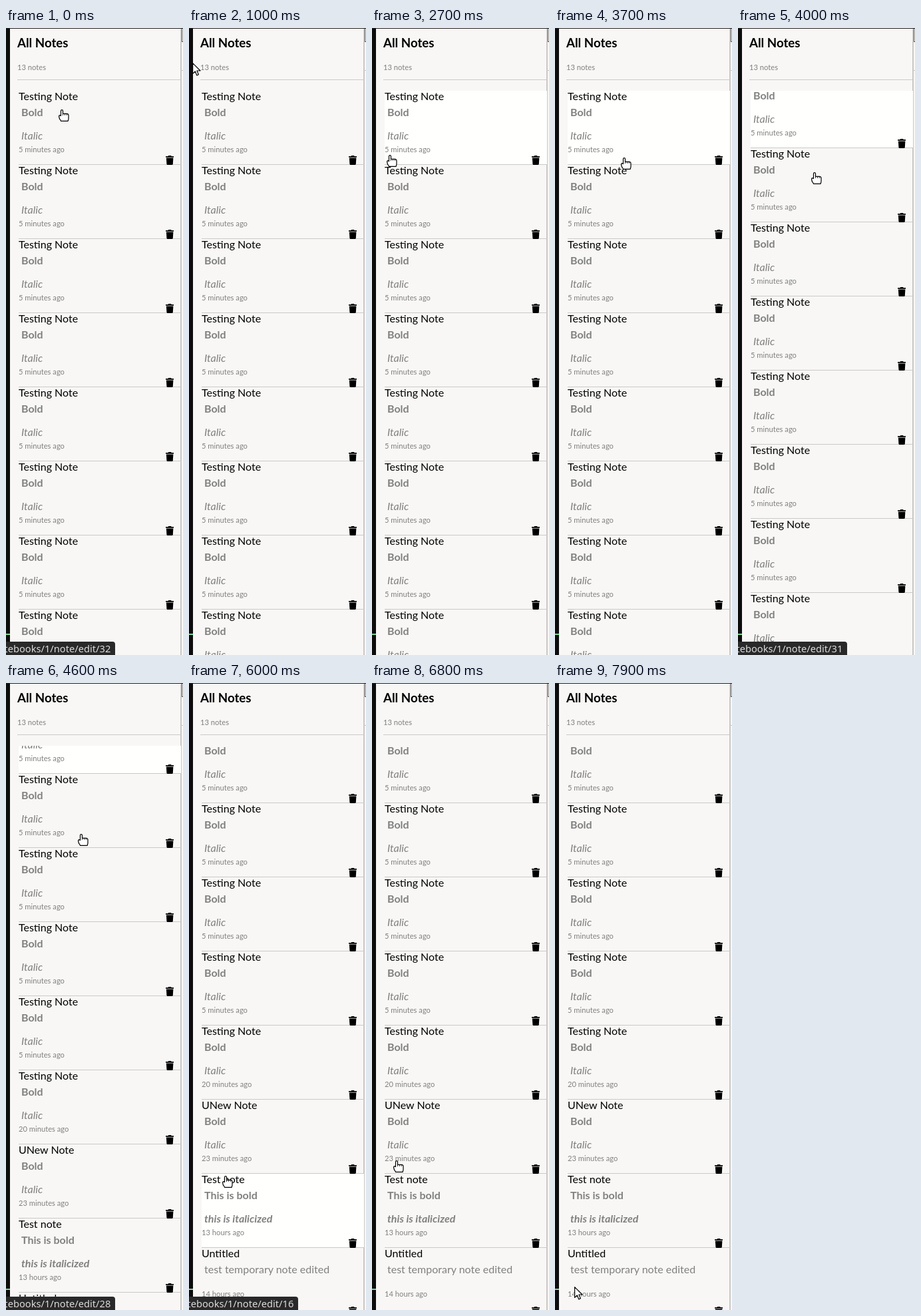
These frames come from a looping animation (266x939 px, 8 s). An HTML page:

```html
<!DOCTYPE html>
<html lang="en">
<head>
<meta charset="utf-8">
<title>All Notes</title>
<style>
  html, body { margin: 0; width: 100%; height: 100%; overflow: hidden; background: #f8f7f5; }
  body { position: relative; font: 16px Lato, sans-serif; white-space: nowrap; color: #000; }
  body * { position: absolute; box-sizing: border-box; }
  script { display: none; }
  .strip { left: 0; top: 0; width: 6px; height: 939px; background: #0c0c0c; }
  .strip i { top: 907px; width: 6px; height: 2px; background: #7fd492; }
  .edge { left: 262px; top: 0; width: 2px; height: 939px; background: #c9c8c7; }
  .field { left: 264px; top: 0; width: 9px; height: 21px; border: 1px solid #55534f; }
  .top { left: 0; top: 0; width: 266px; height: 1px; background: #222; }
  .rule { height: 1px; background: #cbcac8; }
  .heading { left: 17px; top: 11px; font-size: 18.72px; font-weight: 700; }
  .small { font-size: 11.2px; color: #808080; }
  .count { left: 17px; top: 52px; }
  #view { left: 0; top: 94px; width: 266px; height: 845px; overflow: hidden; }
  .note { left: 19px; width: 244px; height: 111px; }
  .note.short { height: 102px; }
  .note .rule { left: 0; bottom: 0; width: 100%; }
  .fill { inset: 0 0 1px; background: #fffffd; visibility: hidden; }
  .title { top: -2px; }
  .body { left: 4px; top: 22px; color: #808080; }
  .second { top: 57px; font-style: italic; }
  .bold { font-weight: 700; }
  .age { top: 81px; }
  .short .age { top: 62px; }
  .trash { left: 220.75px; bottom: 0; width: 12.25px; height: 14px; }
  #status { left: 0; top: 919px; width: 164px; height: 20px; overflow: hidden;
    background: #292929; border-radius: 0 4px 0 0; }
  #link { right: 6.7px; top: 0; font: 14.67px/20px "Noto Sans", "Open Sans", sans-serif; color: #dcdcdc; }
  .pointer { left: 0; top: 0; width: 16px; height: 20px; overflow: visible;
    fill: #fff; stroke: #000; stroke-width: 1.2; stroke-linejoin: round; }
</style>
</head>
<body>
<div class="strip"><i></i></div>
<div class="edge"></div>
<div class="field"></div>
<div class="rule" style="left:264px;top:63px;width:2px"></div>
<div class="top"></div>
<div class="heading">All Notes</div>
<div class="small count">13 notes</div>
<div class="rule" style="left:17px;top:77px;width:245px"></div>
<div id="view"><div id="list"></div></div>
<div id="status"><span id="link"></span></div>
<svg class="pointer" id="arrow"><path d="M.6.6V16.4L4.3 13 6.8 18.9 9.4 17.8 6.9 12H12z"/></svg>
<svg class="pointer" id="hand">
  <path d="M-1.5 9.5V2.2Q-1.5.7 0 .7T1.5 2.2V6.3H7.5Q10 6.5 10 9V13.5Q10 15 9 17.4H-1.5Q-1.8 15.8-3.6 14L-4.4 10.5Q-4.4 8.5-3 8.7Z"/>
  <path d="M1.5 6.3V9M4.4 6.5V9M7.2 6.5V9" stroke-width=".8"/>
</svg>
<script>
const $ = id => document.getElementById(id);
const LOOP = 8000, FRAME = 100, LAG = 200, ROW = 111, TOP = 94, LEFT = 19;

const note = (id, title, body, second, age, style = 'bold') => ({ id, title, body, second, age, style });
const sample = (id, age) => note(id, 'Testing Note', 'Bold', 'Italic', age);
const notes = [
  ...Array.from({ length: 8 }, (_, i) => sample(32 - i, '5 minutes ago')),
  sample(24, '20 minutes ago'),
  note(18, 'UNew Note', 'Bold', 'Italic', '23 minutes ago'),
  note(16, 'Test note', 'This is bold', '<b>this is italicized</b>', '13 hours ago'),
  note(15, 'Untitled', 'test temporary note edited', '', '14 hours ago', '')
];

const trash = `<svg class="trash" viewBox="0 0 448 512">
  <path d="M16 32H136L150 0H298L312 32H432Q448 32 448 48V80Q448 96 432 96H16Q0 96 0 80V48Q0 32 16 32z
    M32 128H416L395 467Q390 512 347 512H101Q58 512 53 467z"/></svg>`;

$('list').innerHTML = notes.map((n, i) => `
  <div class="note ${n.second ? '' : 'short'}" style="top:${i * ROW}px">
    <div class="fill"></div><div class="rule"></div>
    <div class="title">${n.title}</div>
    <div class="body ${n.style}">${n.body}</div>
    <div class="body second">${n.second}</div>
    <div class="small age">${n.age}</div>${trash}
  </div>`).join('');
const fills = document.querySelectorAll('.fill');

// Each move: start, end, then the position reached.
const pointerMoves = [
  [0, 600, 1, 36], [600, 1000, 5, 52], [1000, 1400, 1, 41], [1500, 1900, 51, 175],
  [2000, 2400, 27, 190], [2700, 2900, 66, 191], [3000, 3200, 42, 213], [3200, 3500, 104, 194],
  [3800, 4000, 115, 216], [4000, 4500, 113, 226], [5000, 5500, 114, 672], [5600, 5800, 78, 741],
  [5800, 6000, 55, 738], [6100, 6600, 1, 748], [6600, 7000, 73, 682], [7100, 7500, 194, 848],
  [7600, 7700, 130, 882], [7800, 7900, 29, 904]
];
const scrollMoves = [[3900, 4000, 25], [4000, 4600, 402], [4600, 4800, 469]];

const clamp = v => Math.min(1, Math.max(0, v));
const glide = (moves, from, t, col = 2) => Math.round(moves.reduce(
  (v, m) => v + (m[col] - v) * clamp((t - m[0]) / (m[1] - m[0])), from));

const scrollAt = t => glide(scrollMoves, 0, t);
const pointerAt = t => ({ x: glide(pointerMoves, 84, t), y: glide(pointerMoves, 122, t, 3) });

// Index of the note below the pointer, or -1; the pointer is released at the end.
function under(t) {
  const { x, y } = pointerAt(t);
  if (t < 0 || t >= 7900 || x < LEFT || y < TOP) return -1;
  return Math.floor((y - TOP + scrollAt(t)) / ROW);
}

function lastUnder(t) {
  while (t > 0 && under(t) < 0) t -= FRAME;
  return under(t);
}

const show = (el, on) => el.style.visibility = on ? 'visible' : 'hidden';

function draw(now) {
  const t = Math.floor((now % LOOP) / FRAME) * FRAME;
  const { x, y } = pointerAt(t);
  const current = under(t);
  const active = current < 0 ? -1 : under(t - LAG);

  $('list').style.top = -scrollAt(t) + 'px';
  fills.forEach((el, i) => show(el, i === active));

  const fadeEnd = t < 3800 ? 1000 : 6700;
  $('status').style.opacity = t >= 1000 && t < 3800 ? 0 : clamp((fadeEnd - t) / 300);
  $('link').textContent = 'notebooks/1/note/edit/' + notes[lastUnder(t)].id;

  for (const [id, on] of [['arrow', current < 0], ['hand', current >= 0]]) {
    $(id).style.transform = `translate(${x}px, ${y}px)`;
    show($(id), on);
  }
}

const start = performance.now();
function tick() {
  draw(performance.now() - start);
  requestAnimationFrame(tick);
}
draw(0);
requestAnimationFrame(tick);
</script>
</body>
</html>
```
